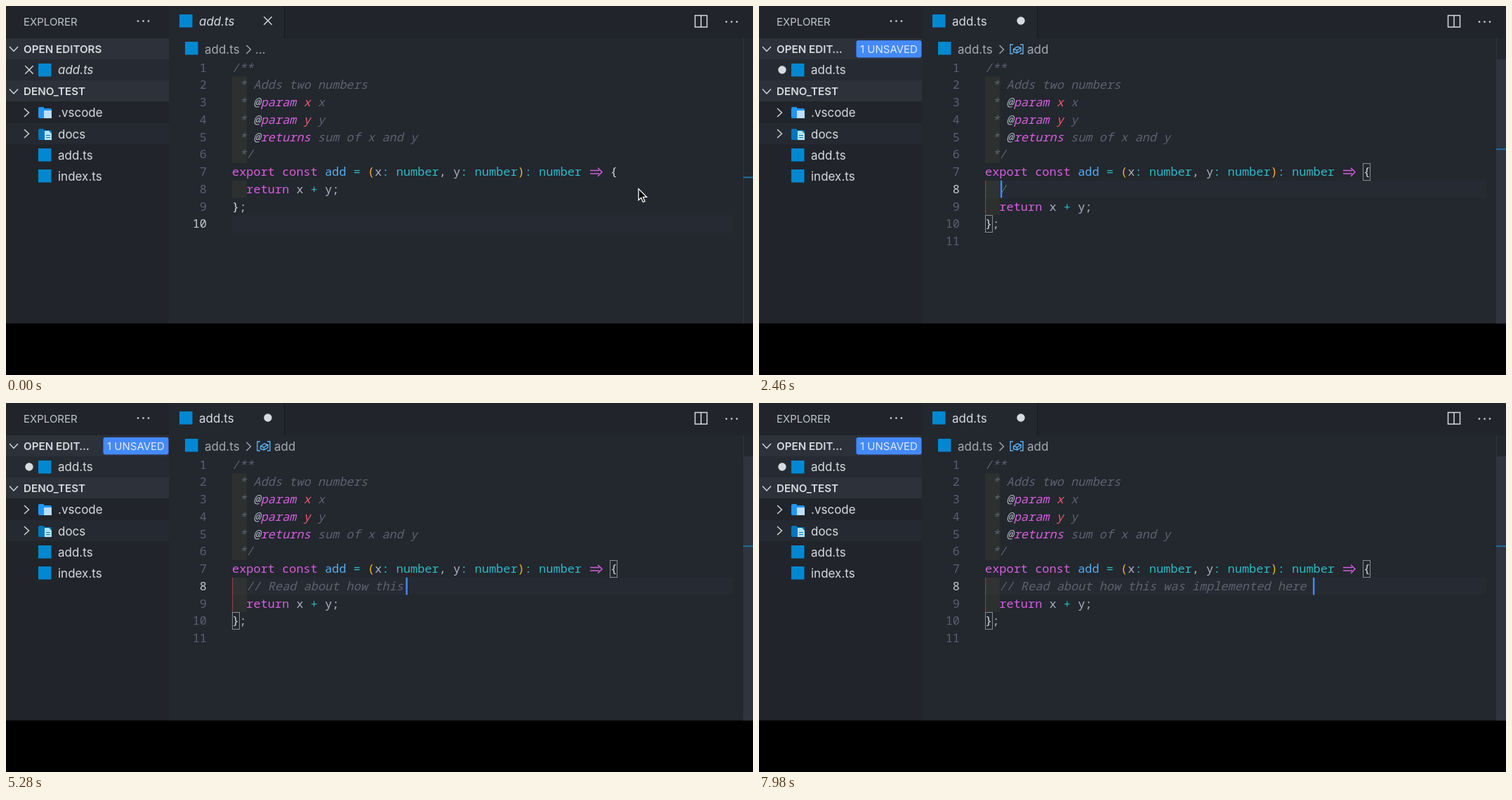
Recreate the animation shown at these times as an HTML page with a canvas. Size 1064 by 526 pixels, loop 8 s.

```html
<!DOCTYPE html>
<html lang="en">
<head>
<meta charset="utf-8">
<title>Typing a comment in a code editor</title>
<style>
  html, body { margin: 0; width: 100%; height: 100%; overflow: hidden; background: #000; }
  canvas { display: block; }
</style>
</head>
<body>
<canvas id="stage" width="1064" height="526"></canvas>
<script>
const ctx = document.getElementById('stage').getContext('2d');

const LOOP = 8000, STEP = 60;
const CLICK = 580, BLINK = 1080, ENTER = 1500, CARET_LEAVES = 1560;
const REFRESH = 1680, BLINK_2 = 2100, GLIDE = 85;

const LEFT = 322, CHAR = 10.164, ROW = 24.75, TOP = 75.5, BOTTOM = 452.5;
const MONO = '16.94px "Noto Sans Mono", "DejaVu Sans Mono", monospace';
const SANS = 'Inter, "Open Sans", sans-serif';

const C = {
  editor: '#23272e', side: '#21252b', header: '#2c313a', row: '#262a32',
  text: '#abb2bf', bright: '#d7dae0', comment: '#5c6370', number: '#596070',
  purple: '#d55fde', red: '#ef596f', cyan: '#2bbac5', blue: '#52adf2',
  gold: '#f0b428', icon: '#0288d1', accent: '#448aff', crumb: '#a4a9b3'
};

const COMMENT = '// Read about how this was implemented here ';
// [characters typed, time]; keys fall evenly between these points
const RHYTHM = [[1, 2442], [7, 3174], [13, 3980], [14, 4190], [15, 4410],
  [23, 5245], [28, 5740], [31, 6200], [32, 6749], [44, 7880]];

const keyTimes = [];
for (let i = 1; i < RHYTHM.length; i++) {
  const [n0, t0] = RHYTHM[i - 1], [n1, t1] = RHYTHM[i];
  for (let n = n0; n <= n1; n++) keyTimes[n - 1] = t0 + (t1 - t0) * (n - n0) / (n1 - n0);
}

// Each piece: column, text, colour, italic
const doc = (...extra) => [[1, '*', C.comment, true], ...extra];
const tag = (name, ...rest) => doc([3, '@', C.text, true], [4, name, C.purple, true], ...rest);
const HEAD = [
  [[0, '/**', C.comment, true]],
  doc([3, 'Adds two numbers', C.comment, true]),
  tag('param', [10, 'x', C.red, true], [12, 'x', C.comment, true]),
  tag('param', [10, 'y', C.red, true], [12, 'y', C.comment, true]),
  tag('returns', [12, 'sum of x and y', C.comment, true]),
  [[1, '*/', C.comment, true]],
  [[0, 'export const', C.purple], [13, 'add', C.blue], [17, '=', C.cyan], [19, '(', C.gold],
    [20, 'x', C.text], [21, ':', C.cyan], [23, 'number', C.cyan], [29, ',', C.text],
    [31, 'y', C.text], [32, ':', C.cyan], [34, 'number', C.cyan], [40, ')', C.gold],
    [41, ':', C.cyan], [43, 'number', C.cyan], [53, '{', C.bright]]
];
const TAIL = [
  [[2, 'return', C.purple], [9, 'x', C.text], [11, '+', C.cyan], [13, 'y;', C.text]],
  [[0, '}', C.bright], [1, ';', C.text]],
  []
];

const rowTop = line => TOP + (line - 1) * ROW;
const colX = col => LEFT + col * CHAR;

function rect(x, y, w, h, color) {
  ctx.fillStyle = color;
  ctx.fillRect(x, y, w, h);
}
function text(str, x, y, color, font) {
  ctx.font = font;
  ctx.fillStyle = color;
  ctx.fillText(str, x, y);
}
function label(str, x, y, color = C.bright, style = '', size = 17) {
  text(str, x, y, color, `${style} ${size}px ${SANS}`);
}
function stroke(path, color = C.bright, width = 1.4) {
  ctx.strokeStyle = color;
  ctx.lineWidth = width;
  ctx.stroke(new Path2D(path));
}
function fill(path, color) {
  ctx.fillStyle = color;
  ctx.fill(new Path2D(path));
}
function dot(x, y, r, color = C.bright) {
  ctx.fillStyle = color;
  ctx.beginPath();
  ctx.arc(x, y, r, 0, 7);
  ctx.fill();
}
const dots = (x, y) => [0, 7.5, 15].forEach(d => dot(x + d, y, 1.3));
const fileIcon = (x, y) => rect(x, y, 18.5, 18.5, C.icon);
const cross = (x, y) => stroke(`M${x - 5.7} ${y - 5.7}l11.4 11.4m0 -11.4l-11.4 11.4`);
const chevronDown = y => stroke(`M5 ${y - 3}l6 6.5l6 -6.5`);
const chevronRight = (x, y) => stroke(`M${x} ${y - 6}l6.5 6l-6.5 6`);
const folder = (y, color) =>
  fill(`M47 ${y}h6l2 2h8q2 0 2 2v10q0 2 -2 2h-15q-2 0 -2 -2v-12q0 -2 2 -2z`, color);

function drawSidebar(dirty) {
  rect(0, 0, 232, BOTTOM, C.side);
  rect(0, 46, 232, 30, C.header);
  rect(0, 76, 232, 30, C.row);
  rect(0, 106, 232, 30, C.header);
  rect(0, 167, 232, 30, '#252931');
  label('EXPLORER', 25, 27.5, '#c0c4cc', '', 15);
  dots(188, 21.5);

  chevronDown(61);
  chevronDown(121.5);
  label(dirty ? 'OPEN EDIT…' : 'OPEN EDITORS', 25, 66.5, C.bright, '600', 15.2);
  label('DENO_TEST', 25, 127, C.bright, '600', 15.2);
  if (dirty) {
    ctx.fillStyle = C.accent;
    ctx.beginPath();
    ctx.roundRect(138.5, 49, 93, 24.5, 3);
    ctx.fill();
    label('1 UNSAVED', 144, 66.5, '#e4e9f4', '', 15);
    dot(33, 91, 5.7);
  } else {
    cross(33, 91);
  }
  fileIcon(46, 82);
  label('add.ts', 74, 97, C.bright, dirty ? '' : 'italic');

  chevronRight(26, 152);
  folder(144, '#2196f3');
  rect(54, 149, 11, 11, '#bbdefb');
  label('.vscode', 74, 158);
  chevronRight(26, 182);
  folder(175, '#0277bd');
  fill('M55 178h6l4 4v9h-10z', '#b3e5fc');
  stroke('M57 184.5h6m-6 3h6', '#0277bd', 1.2);
  label('docs', 74, 188.5);
  fileIcon(46, 203);
  label('add.ts', 74, 218.5);
  fileIcon(46, 233);
  label('index.ts', 74, 248.5);
}

function drawTabs(dirty, inFunction) {
  rect(396, 0, 668, 46, C.side);
  rect(396, 0, 1.3, 46, '#181a1f');
  fileIcon(247, 12);
  label('add.ts', 275, 28, C.bright, dirty ? '' : 'italic');
  dirty ? dot(373, 21, 5.7) : cross(373, 21);
  stroke('M981.5 13.5h17v16.5h-17zM990 13.5v16.5', C.bright, 1.5);
  dots(1026, 22.5);

  fileIcon(255, 51);
  label('add.ts', 283, 67.5, C.crumb);
  stroke('M342.5 56l6 6l-6 6', C.crumb);
  if (inFunction) {
    stroke('M362 55h-4v13h4M372 55h4v13h-4M362.5 61.5l5.5 -3.5l5 1.5v4l-5.5 3.5l-5 -1.5zl5 1.5l5.5 -3.5m-5.5 3.5v4',
      '#5fb4f5');
    label('add', 382, 67.5, C.crumb);
  } else {
    label('…', 355, 67.5, C.crumb);
  }
}

function drawRuler(t, active, closing) {
  const unit = t < ENTER ? 18.7 : 18.3;
  const markY = line => 76 + (line - 1) * unit;
  rect(1050, 46, 1, BOTTOM - 46, '#30343c');
  ctx.globalAlpha = Math.min(1, Math.max(0, (t - 60) / 120));
  rect(1050, 76, 14, BOTTOM - 76, '#2f343e');
  ctx.globalAlpha = 1;
  if (t >= CLICK && t < REFRESH) {
    [7, closing].forEach(line => rect(1056, markY(line), 7, unit, '#6a707b'));
  }
  rect(1050, markY(active) - 1, 14, 2, '#1f6f9f');
}

function drawCode(t, typed, active, closing) {
  const entered = t >= ENTER;
  const typedLine = [[2, COMMENT.slice(0, typed), C.comment, true]];
  const lines = [...HEAD, ...(entered ? [typedLine] : []), ...TAIL];

  rect(LEFT, rowTop(active), 714, ROW, C.row);
  const indent = (line, count) =>
    rect(LEFT, rowTop(line), 2 * CHAR + 0.7, ROW * count, 'rgba(255,255,64,0.042)');
  indent(2, 5);
  if (t >= REFRESH) {
    indent(8, 2);
    rect(LEFT, rowTop(8), 1.2, ROW * 2, '#8f3b48');
  } else {
    indent(entered ? 9 : 8, 1);
  }

  lines.forEach((pieces, i) => {
    const y = rowTop(i + 1) + 18;
    ctx.textAlign = 'right';
    text(i + 1, 286, y, i + 1 === active ? '#c5cad3' : C.number, MONO);
    ctx.textAlign = 'left';
    for (const [col, str, color, italic] of pieces) {
      text(str, colX(col), y, color, (italic ? 'italic ' : '') + MONO);
    }
  });
  stroke('M832 234.5h13M832 239h13M843 230.8l6 6l-6 6', C.purple, 1.5);

  if (t >= CLICK) {
    ctx.strokeStyle = '#888d96';
    ctx.lineWidth = 1;
    [[53, 7], [0, closing]].forEach(([col, line]) =>
      ctx.strokeRect(Math.floor(colX(col)) + 0.5, Math.round(rowTop(line)) + 0.5, 10, 24));
  }
}

function drawCaret(t, typed) {
  const hidden = t < CLICK || (t >= BLINK && t < ENTER) || (t >= BLINK_2 && !typed);
  if (hidden) return;
  const glide = start => Math.min(1, Math.max(0, (t - start) / GLIDE));
  let col, line;
  if (typed) {
    col = 1 + typed + glide(keyTimes[typed - 1]);
    line = 8;
  } else {
    const p = glide(CARET_LEAVES);
    col = 54 - 52 * p;
    line = 7 + p;
  }
  rect(colX(col) - 0.6, rowTop(line), 2.4, ROW, C.accent);
}

function drawPointer(t) {
  if (t >= ENTER) return;
  if (t < 60) {
    const arrow = 'M901 260.5v16.2l3.7 -3.4l2.6 6.2l2.7 -1.2l-2.6 -6h5.2z';
    fill(arrow, '#000');
    stroke(arrow, '#fff', 1.3);
    return;
  }
  const p = Math.min(1, (t - 60) / 480), ease = p * (2 - p);
  const x = 901 - 8 * ease, y = 264 - 25 * ease;
  stroke(`M${x - 3} ${y - 8}q3 0 3 2v12q0 2 -3 2m6 -16q-3 0 -3 2m0 12q0 2 3 2`, '#d0d3d9', 1.2);
}

function draw(t) {
  const typed = keyTimes.filter(key => key <= t).length;
  const entered = t >= ENTER, clicked = t >= CLICK;
  const active = entered ? 8 : clicked ? 7 : 10;
  const closing = entered ? 10 : 9;
  rect(0, 0, 1064, 526, '#000');
  rect(232, 0, 832, BOTTOM, C.editor);
  drawSidebar(entered);
  drawTabs(entered, clicked);
  drawCode(t, typed, active, closing);
  drawRuler(t, active, closing);
  drawCaret(t, typed);
  drawPointer(t);
}

const start = performance.now();
function tick() {
  const t = (performance.now() - start) % LOOP;
  draw(Math.floor(t / STEP) * STEP);
  requestAnimationFrame(tick);
}
tick();
</script>
</body>
</html>
```
